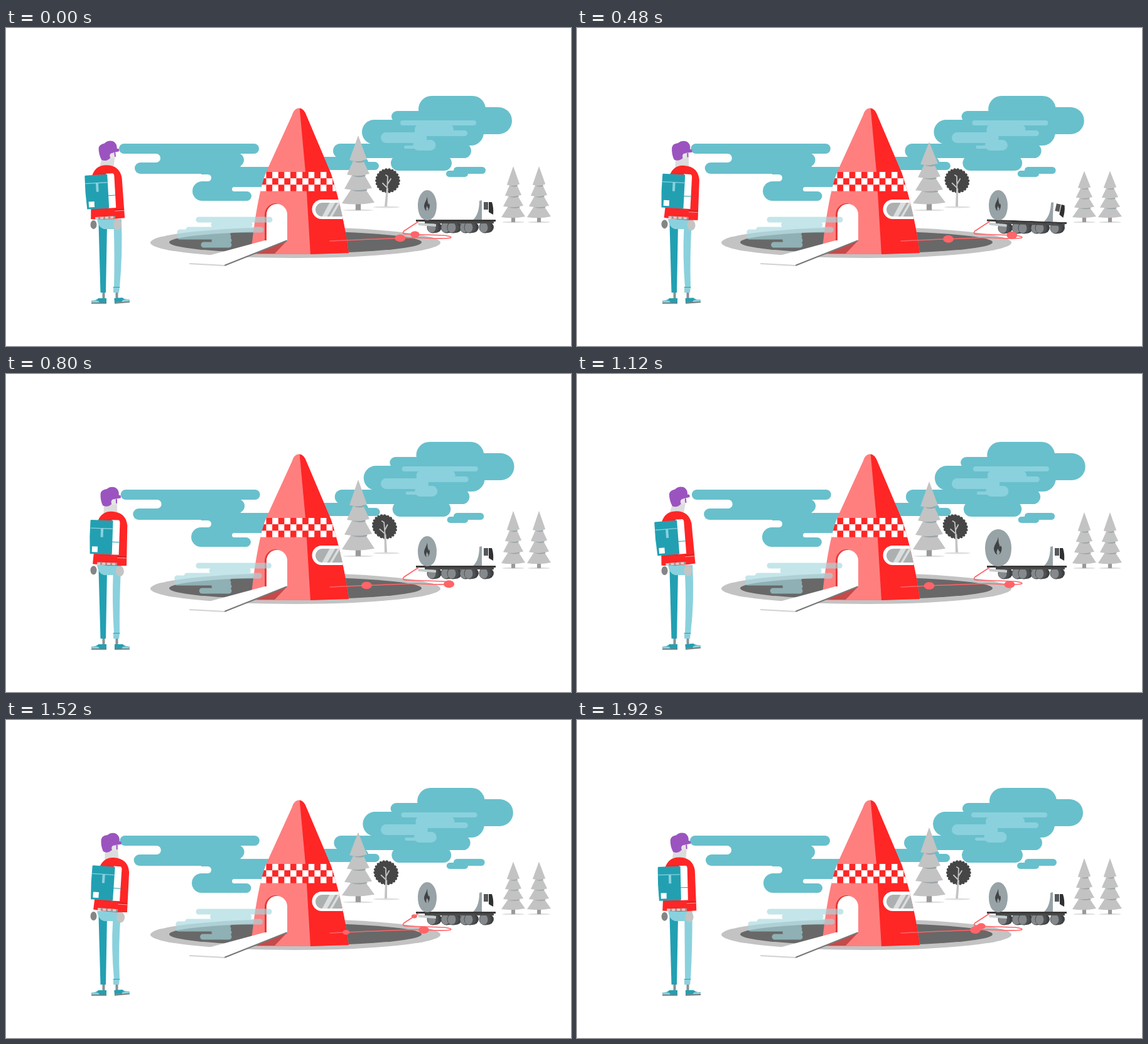
Recreate the animation shown at these times as an HTML page with a canvas. Size 900 by 506 pixels, loop 2 s.

```html
<!DOCTYPE html>
<html lang="en">
<head>
<meta charset="utf-8">
<title>Cone in the clearing</title>
<style>
html, body { margin: 0; width: 100%; height: 100%; overflow: hidden; background: #fff; }
canvas { display: block; }
</style>
</head>
<body>
<canvas id="stage" width="900" height="506"></canvas>
<script>
const c = document.getElementById('stage').getContext('2d');
const TAU = Math.PI * 2, LOOP = 2000, STEP = 80;
const RED = '#ff2626', PINK = '#ff7f7f', HOSE = '#ff6468', PURPLE = '#9b54bf';
const TEAL = '#22a0b2', AQUA = '#68c0cc', SKY = '#8ad1dd';
const GREY = '#c3c3c3', STEEL = '#98a3a7', DARK = '#464646';

const hosePath = document.createElementNS('http://www.w3.org/2000/svg', 'path');
hosePath.setAttribute('d', 'M657 308L634 323Q629 328 640 328L698 330Q712 332 708 334' +
  'Q694 336 655 333.5Q600 335 516 339');

function fill(color, d) {
  c.fillStyle = color;
  c.fill(new Path2D(d));
}
function line(color, width, d) {
  c.strokeStyle = color;
  c.lineWidth = width;
  c.stroke(new Path2D(d));
}
function oval(color, x, y, rx, ry = rx) {
  c.fillStyle = color;
  c.beginPath();
  c.ellipse(x, y, rx, ry, 0, 0, TAU);
  c.fill();
}
function box(color, x, y, w, h) {
  c.fillStyle = color;
  c.fillRect(x, y, w, h);
}
function group(draw) {
  c.save();
  draw();
  c.restore();
}
function turn(x, y, degrees) {
  c.translate(x, y);
  c.rotate(degrees * Math.PI / 180);
  c.translate(-x, -y);
}
const bump = (t, centre, width) => Math.exp(-(((t - centre) / width) ** 2));

// Clouds are thick round-ended strokes; d is how far their ends have drifted.
function clouds(d) {
  line(AQUA, 16, `M${188 + d} 192H${395 + d * .6}`);
  line(AQUA, 22, `M241 210H${368 + d * .4}`);
  line(AQUA, 18, `M${214 - d} 223H365`);
  line(AQUA, 32, 'M326 237H500');
  line(AQUA, 31, `M${312.5 - d * .7} 259.5H350`);
  line(AQUA, 15, `M320 267.5H${383.5 - d * .4}`);
  line('#fff', 14, `M185 207H${239 + d * .6}`);
  line('#fff', 11, 'M285 238.5H321.5');
  line('#fff', 7, 'M363.5 256.5H450');

  line(AQUA, 42, `M${678 - d * 1.3} 129H${743 - d}`);
  line(AQUA, 18, `M${623 - d} 141H700`);
  line(AQUA, 43, `M741 147.5H${784.5 + d * 1.3}`);
  line(AQUA, 39, `M${586.5 + d} 165.5H680`);
  line(AQUA, 41, `M660 166.5H${740.5 + d * .6}`);
  line(AQUA, 23, `M${532.5 + d} 195.5H${729.5 - d}`);
  line(AQUA, 24, `M${625 + d} 215H${698 - d * .6}`);
  line(AQUA, 21, 'M490 215.5H567');
  line(AQUA, 13, `M490 219.5H${587.5 + d * .6}`);
  line(AQUA, 11, `M718.5 226.5H${758.5 - d}`);
  line(AQUA, 10, `M${706 + d * .6} 232H731`);

  line(SKY, 8, `M${632 + d} 151H${745 + d}`);
  line(SKY, 14, `M${658 + d} 161H${706 + d}`);
  line(SKY, 17, `M605.5 174.5H${662 + d}`);
  line(SKY, 9, `M${655 + d} 167.5H${730.5 + d * .6}`);
  line(SKY, 5, `M${636.5 + d} 189.5H${660 + d}`);
  line(SKY, 17, `M${657 + d} 186.5H${676 + d}`);
}

function mist(d) {
  line('rgba(165,215,222,.65)', 9, `M307 305H${420 - d * .6}M${331 - d} 313H${388 - d}` +
    `M${291 - d} 321H${406 - d}M${277 - d * 1.6} 325H354M${277 - d * 1.6} 332H354` +
    `M332 338H355M${315 - d} 345H355`);
}

function conifer(x, base, half, height, scale) {
  const trunk = half / 2.4;
  oval('#dedede', x, base + trunk, half * .93, 1.3);
  box('#999', x - half * .16, base - 4, half * .32, trunk + 4);
  group(() => {
    c.translate(x, base);
    c.scale(half, height * scale);
    for (let i = 0; i < 4; i++) {
      const y = -i * .212, w = 1 - i * .155, side = w * .55;
      fill(GREY, `M0 ${y - .365}L${w} ${y - .012}Q0 ${y + .035} ${-w} ${y}Z`);
      if (i) fill(STEEL, `M${-side} ${y + .012}Q0 ${y + .03} ${side * 1.2} ${y + .002}` +
        `L${side * 1.15} ${y + .024}Q0 ${y + .055} ${-side} ${y + .012}Z`);
    }
  });
}

function roundTree(k) {
  oval('#dedede', 606, 285, 21, 1.4);
  group(() => {
    c.transform(1, 0, .135 * k, 1, -.135 * 284 * k, 0);
    oval(DARK, 608, 243, 18);
    for (let i = 0; i < 22; i++) {
      const a = i * TAU / 22;
      oval(DARK, 608 + 17.5 * Math.cos(a), 243 + 17.5 * Math.sin(a), 2.4);
    }
    line(GREY, 1.8, 'M607 262L608 236L605 234M608 248L613 240M607 254L600 247');
    fill(GREY, 'M603 284L606 255H609L607 284Z');
  });
}

function hole() {
  oval(GREY, 461, 341.5, 231, 24.5);
  oval('#686868', 461, 341, 201, 17.5);
}

function cone() {
  group(() => {
    c.clip(new Path2D('M390 360C394 318 402 262 414 230L456 138C460 124 473 124 478 138' +
      'L517 230C527 260 539 305 546 358L485 360Z'));
    box(PINK, 380, 120, 170, 242);
    fill(RED, 'M467 120L477 229L485 361H560V120Z');
    for (let row = 0; row < 3; row++)
      for (let col = 0; col < 14; col++)
        box((row + col) % 2 ? RED : '#fff', 405 + col * 9.6, 229 + row * 10.2, 9.7, 10.2);
    fill('#fff', 'M550 273H503A15.5 15.5 0 0 0 503 304H550Z');
    group(() => {
      c.clip(new Path2D('M550 278H504A11 11 0 0 0 504 300H550Z'));
      box('#adb0b1', 490, 276, 60, 26);
      fill('#dcdede', 'M516 277H525L511 301H503ZM529 277H533L519 301H515Z');
    });
  });
  fill('#e33b3b', 'M412 338V297A18 18 0 0 1 431 279L436 282V338Z');
  fill('#fff', 'M415 338V297A16.5 17 0 0 1 448 297V339L415 345Z');
  fill('#c54a4a', 'M398 359L448 338L428 359Z');
  fill('#fff', 'M323 362L412 338H448L348 377L293 374Z');
  line('#d2d2d2', 2, 'M293 375L348 378');
  line('#777', 2, 'M349 377.5L447 338.5');
}

function wheel(x, y) {
  oval('#3f4143', x + 3, y, 10, 9);
  oval('#4d5052', x - 1, y, 9.5, 9.5);
  oval('#85898c', x - 3, y + .5, 6.5, 8);
}

function truck(t) {
  const jolt = bump(t, 480, 110);
  const swell = bump(t, 1110, 120), squeeze = bump(t, 1370, 70);
  for (const x of [681, 703, 713, 733, 740, 764]) wheel(x, 317 + jolt);
  group(() => {
    turn(670, 306, 2.1 * jolt);
    box('#3a3a3a', 653, 305, 127, 3);
    box('#4a4a4a', 667, 308, 110, 3);
    fill('#c8cccd', 'M656 310L685 312V316L657 314Z');
    fill('#fff', 'M671 260H745Q754 280 745 305H671Z');
    fill(STEEL, 'M758 274V305H744Q754 296 754 275Z');
    fill('#fff', 'M758 274H774L777 305H758Z');
    turn(768, 287, 10 * jolt);
    fill('#55585a', 'M761 277H768V289H761Z');
    fill('#303030', 'M769 277H774Q777 286 776 297L769 293Z');
  });
  group(() => {
    c.translate(671, 306);
    c.scale(1 + .4 * swell, 1 + .23 * swell - .13 * squeeze);
    fill(STEEL, 'M0 -48C9 -48 15 -36 15 -24C15 -9 9 0 0 0C-9 0 -15 -9 -15 -24C-15 -36 -9 -48 0 -48Z');
    fill('#404345', 'M0 -38C-1 -31 -5 -28 -5 -22Q-4 -16 -1 -15Q-3 -19 0 -23Q0 -20 2 -19L1 -15' +
      'Q4 -18 4 -24L3 -27L2 -25Q0 -31 0 -38Z');
  });
}

// A lump leaves the tank once per loop and takes over two loops to reach the cone.
function hose(t) {
  line(HOSE, 1.7, hosePath.getAttribute('d'));
  for (let n = 0; n < 3; n++) {
    const age = (t - 1240) / 1000 + 2 * n;
    if (age < 0) continue;
    const way = 79 * age - 2.6 * age * age - 8 + 6 * Math.sin(TAU * t / LOOP);
    const r = Math.max(0, Math.min(8.5, 2.8 + 6 * age, (4.65 - age) * 15));
    const { x, y } = hosePath.getPointAtLength(Math.max(0, way));
    oval(HOSE, x, y, r, r * .7);
  }
}

function shoe(x, way) {
  group(() => {
    c.translate(x, 0);
    c.scale(way, 1);
    fill(TEAL, 'M0 430H13Q15 433 24 434L24 437H0Z');
    fill(SKY, 'M13 434Q20 432 24 435V437H11Z');
    box('#777', 0, 436.8, 24, 1.9);
  });
}

function man(t) {
  const p = .5 - .53 * Math.cos(TAU * (t - 120) / 1000);
  const tap = .5 + .5 * Math.cos(TAU * (t - 80) / 500);

  box('#8f8f8f', 153.5, 420, 4, 11);
  shoe(160, -1);
  box('#8f8f8f', 174.5, 420, 4, 11);
  group(() => {
    turn(174, 438, -6 * tap);
    shoe(173, 1);
  });
  fill(TEAL, 'M147.5 312H161L159 421H150.5Z');
  fill(SKY, `M145 304Q147 318 156 320H${172 - 2 * p}Q${174 - 7 * p} 362 172 413H181` +
    `Q${187 - 9 * p} 360 ${184 - p} 304Z`);
  fill(SKY, 'M171 412H181L180 421H171Z');
  line(TEAL, 1, 'M171 412.5H181');
  oval('#858585', 139.5, 313 - p, 5, 7);
  oval('#c4c4c4', 177 + 6 * p, 313 + p, 6.5, 8.5);

  const neck = 148 + 10 * p, head = 4 * p;
  fill('#dcdcdc', `M${154 + head} 199H${174 + head}L${neck + 22} 222H${neck}Z`);
  group(() => {
    c.translate(4 * p - 2, 0);
    turn(160, 308, -4.2 + 8.6 * p);
    fill(RED, 'M137 303L141 240Q146 218 165 218.5Q187 219 190 240L191 304Q165 306 137 303Z');
    line('#b51c24', 1, 'M176 290H190');
    line('#ff9a9a', 1, 'M176 292H190');
    box('#d0d0d0', 144, 300, 30, 4);
    for (let x = 149; x < 174; x += 8) box('#969696', x, 300, 3, 4);
    fill('#fff', 'M165 232H176Q178 233 178 236V287H165Z');
    fill(TEAL, 'M132 233H167V287H132Q130 260 131 234Z');
    line(SKY, 1.3, 'M132 246H166');
    box(SKY, 148, 246, 4, 14);
    line(TEAL, 1, 'M167 267H178');
    box('#fff', 135, 275, 9, 9);
  });
  group(() => {
    c.translate(head - 4, 0);
    turn(166, 200, -6 + 6 * p);
    fill(PURPLE, 'M152 190Q153 184 162 183Q168 178 176 181Q182 185 181 193L184 194V198' +
      'L175 199Q170 200 169 207Q162 213 155 209Q151 200 152 190Z');
    oval('#e5e5e5', 172.5, 204, 4, 4.5);
    box(PURPLE, 176, 199, 2, 7);
  });
}

function draw(t) {
  const k = .5 - .5 * Math.cos(TAU * t / LOOP), beat = t % 1000;
  const squash = 1 - .105 * bump(beat, 430, 140) + .027 * bump(beat, 790, 80);
  c.lineCap = 'round';
  box('#fff', 0, 0, 900, 506);
  clouds(3 * k);
  conifer(561, 279, 26, 108, squash);
  roundTree(k);
  conifer(808, 301, 19, 81, squash);
  conifer(849, 301, 19, 81, squash);
  hole();
  cone();
  mist(3 * k);
  truck(t);
  hose(t);
  man(t);
}

const start = performance.now();
function frame() {
  const t = (performance.now() - start) % LOOP;
  draw(Math.floor(t / STEP) * STEP);
  requestAnimationFrame(frame);
}
frame();
</script>
</body>
</html>
```
